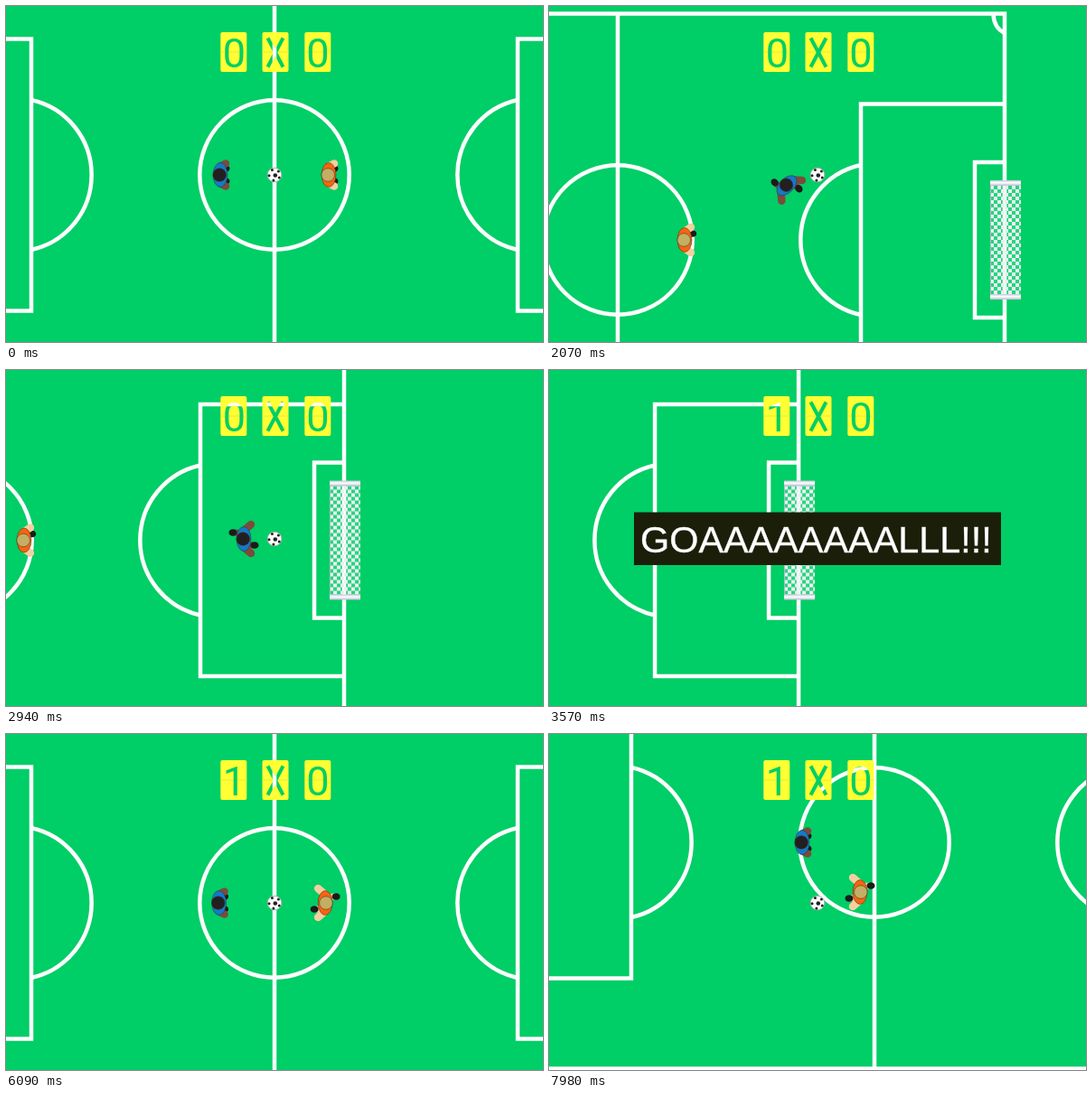
Animation, 594 px wide and 372 px high, one loop 8000 ms. Source, as an HTML page:

```html
<!DOCTYPE html>
<html lang="en">
<head>
<meta charset="utf-8">
<title>Top-down football</title>
<style>
  html, body { margin: 0; width: 100%; height: 100%; overflow: hidden; background: #00ce66; }
  svg { display: block; width: 594px; height: 372px; }
  .line { fill: none; stroke: #fff; stroke-width: 4.5; }
  .digit { font: 45px Roboto, sans-serif; text-anchor: middle; }
  .shout { font: 41.4px "Liberation Sans", Arial, sans-serif; fill: #fff; stroke: #fff; stroke-width: .4; }
</style>
</head>
<body>
<svg viewBox="0 0 594 372">
  <defs>
    <pattern id="mesh" width="8" height="8" patternUnits="userSpaceOnUse">
      <path d="M0 0h4v4h-4zM4 4h4v4h-4z" fill="#eceef2"/>
    </pattern>
    <linearGradient id="bar" x2="0" y2="1">
      <stop offset="0" stop-color="#c3c5d8"/>
      <stop offset=".45" stop-color="#fff"/>
      <stop offset="1" stop-color="#b9bbd0"/>
    </linearGradient>
    <g id="half">
      <g class="line">
        <path d="M0 -250.5H428V250.5H0"/>
        <path d="M428 -150.5H269V150.5H428"/>
        <path d="M428 -86H395V86H428"/>
        <path d="M269 -83A85 85 0 0 0 269 83"/>
        <path d="M415.5 -250Q416 -235 428 -229M415.5 250Q416 235 428 229"/>
      </g>
      <rect x="412" y="-65" width="34" height="130" fill="#fff" opacity=".15"/>
      <rect x="412" y="-65" width="34" height="130" fill="url(#mesh)"/>
      <path d="M412.5 -65V65" stroke="#b9b6cc"/>
      <rect x="412" y="-66" width="34" height="6" fill="url(#bar)"/>
      <rect x="412" y="60" width="34" height="6" fill="url(#bar)"/>
    </g>
    <mask id="cut" maskUnits="userSpaceOnUse" x="230" y="20" width="140" height="60">
      <rect x="230" y="20" width="140" height="60" fill="#fff"/>
      <text class="digit" id="score" x="252.3" y="67.5">0</text>
      <path d="M289.500 35.500L306.500 67.500M306.500 35.500L289.500 67.500" stroke="#000" stroke-width="4"/>
      <text class="digit" x="344.800" y="67.500">0</text>
    </mask>
  </defs>

  <rect width="594" height="372" fill="#00ce66"/>
  <g id="world">
    <use href="#half"/>
    <use href="#half" transform="scale(-1 1)"/>
    <path class="line" d="M0 -250V250"/>
    <circle class="line" r="82.7"/>
    <g id="blue"></g>
    <g id="orange"></g>
  </g>

  <g id="ball" transform="translate(297 187)">
    <circle r="7.8" fill="#fff" stroke="#a9b5ae"/>
    <circle cx=".8" cy=".5" r="2.3" fill="#222"/>
  </g>

  <g id="cards" mask="url(#cut)"></g>

  <g id="banner">
    <rect x="94" y="157.500" width="406" height="58.500" fill="#1b1f0a"/>
    <text class="shout" x="101" y="202">GOAAAAAAAALLL!!!</text>
  </g>
</svg>
<script>
const LOOP = 8000, STEP = 30, STRIDE = 315;
const START = 480, SHOT = 2940, TIRED = 3200, GOAL = 3270, BANNER_END = 4230;
const RESTART = 5220, COUNTER = 6060, LEAD = 110;
const $ = id => document.getElementById(id);
const clamp = (v, lo, hi) => Math.min(hi, Math.max(lo, v));
const ramp = (t, from, to) => clamp((t - from) / (to - from), 0, 1);

function add(parent, tag, attrs) {
  const node = document.createElementNS("http://www.w3.org/2000/svg", tag);
  set(node, attrs);
  return parent.appendChild(node);
}
function set(node, attrs) {
  for (const k in attrs) node.setAttribute(k, attrs[k]);
}

// The ball is dribbled to the right, then shot with friction; later pushed down and left.
function ballX(t) {
  if (t >= RESTART) return -63 * ramp(t, 6270, 7500);
  const dribble = 88 * ramp(t, 660, 1290) + 133 * ramp(t, 1290, 2070) + 130 * ramp(t, 2070, SHOT);
  const roll = clamp(t - SHOT, 0, 900);
  return dribble + 125 * (1 - Math.exp(-roll / 412));
}
function ballY(t) {
  if (t >= RESTART) return 67 * ramp(t, 6270, 7980);
  return -45 * ramp(t, 930, 1210) - 27 * ramp(t, 1500, 1690) + 70.5 * ramp(t, 2100, 2580);
}

// Blue stays behind the ball and turns a little before it does.
function bluePose(t) {
  if (t >= RESTART) return { x: -60 - 20 * ramp(t, COUNTER, 6480), y: 0, angle: 0, stride: 0 };
  const now = Math.min(t, TIRED), y = ballY(now + LEAD);
  return {
    x: ballX(now) - 60 + 26 * ramp(t, START, 660),
    y,
    angle: 45 * Math.sign(ballY(now + LEAD + STEP) - y),
    stride: t > START ? swing((now - 1290) / STRIDE + .13) : 0
  };
}

function orangePose(t) {
  if (t < RESTART) return { x: 60 + 14 * ramp(t, START, 660), y: 0, angle: 0, stride: t > START ? -.45 : 0 };
  const runs = t > COUNTER;
  return {
    x: 60 - 27 * ramp(t, COUNTER, 6270) - 49 * ramp(t, 6270, 7700),
    y: 55 * ramp(t, 6270, 7980),
    angle: runs ? 180 : 0,
    stride: runs ? swing((t - COUNTER - STEP) / STRIDE + .75) : 0
  };
}
const swing = p => clamp(1.6 * Math.sin(2 * Math.PI * p), -1, 1);

function makePlayer(root, shirt, skin, hair) {
  const edge = { stroke: "#3a2a1c", "stroke-width": .5 };
  const limb = width => add(root, "line", { stroke: skin, "stroke-width": width, "stroke-linecap": "round" });
  const sides = [-1, 1].map(side => ({
    side,
    leg: limb(7),
    shoe: add(root, "ellipse", { rx: 4.5, ry: 3.8, fill: "#1d1a1a" }),
    arm: limb(8.5)
  }));
  add(root, "ellipse", { rx: 8, ry: 13.5, fill: shirt, ...edge });
  add(root, "circle", { r: 7.3, cx: -.8, fill: hair, ...edge });

  return ({ x, y, angle, stride }) => {
    root.setAttribute("transform", `translate(${x} ${y}) rotate(${angle})`);
    const run = Math.abs(stride);
    for (const { side, leg, shoe, arm } of sides) {
      const cx = 6 * (1 - run) + 12 * stride * side, cy = 7 * side;
      set(leg, { x1: 0, y1: 6 * side, x2: cx * .8, y2: cy });
      set(shoe, { cx, cy });
      set(arm, { x1: 1, y1: 10 * side, x2: 6 + 2 * run, y2: (12.5 + 3.5 * run) * side });
    }
  };
}

for (let i = 0; i < 5; i++) {
  const a = i * Math.PI * .4 + .5;
  add($("ball"), "circle", { cx: 6 * Math.cos(a), cy: 6 * Math.sin(a), r: 1.5, fill: "#222" });
}
for (const x of [237.3, 283.5, 330.3]) {
  add($("cards"), "rect", { x, y: 29, width: 29, height: 44, rx: 2, fill: "#ffff33" });
  add($("cards"), "path", { d: `M${x} 51h29`, stroke: "#e6ea38" });
}

const drawBlue = makePlayer($("blue"), "#1479c8", "#7b4b3c", "#221f20");
const drawOrange = makePlayer($("orange"), "#f7640f", "#f6cfa0", "#c3ae63");

function frame() {
  const t = Math.floor((performance.now() % LOOP) / STEP) * STEP;
  $("world").setAttribute("transform", `translate(${297 - ballX(t)} ${187 - ballY(t)})`);
  drawBlue(bluePose(t));
  drawOrange(orangePose(t));
  $("score").textContent = t < GOAL ? "0" : "1";
  $("banner").style.display = t >= GOAL && t < BANNER_END ? "" : "none";
  requestAnimationFrame(frame);
}
frame();
</script>
</body>
</html>
```
